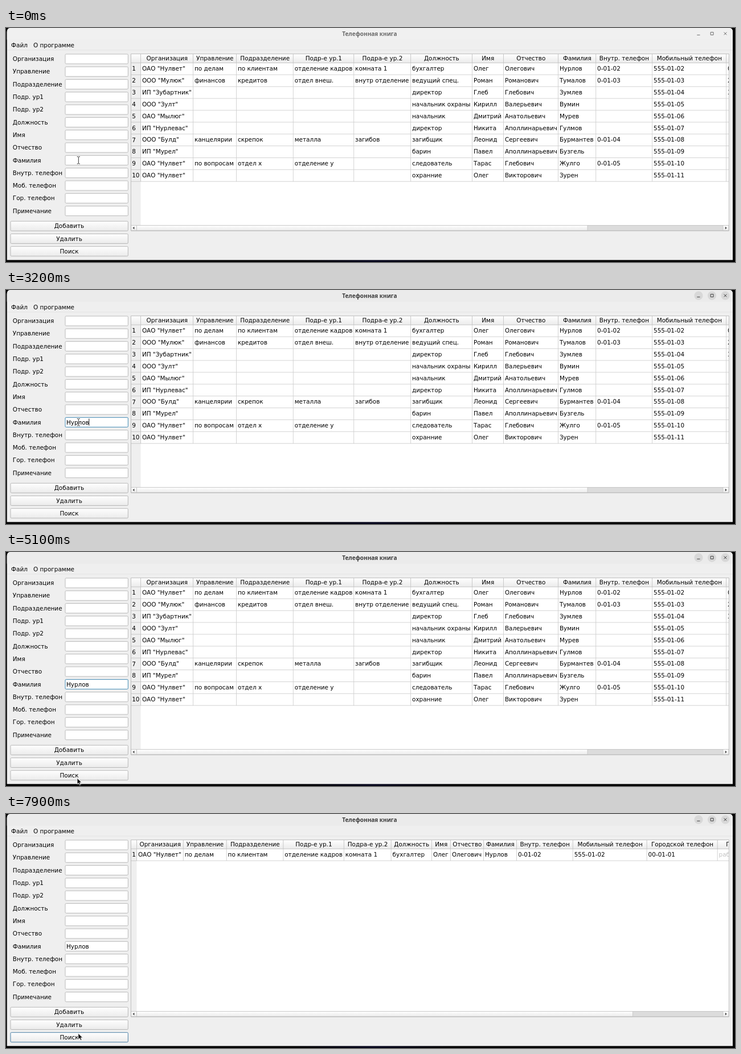
An HTML page for the animation above (8000 ms loop, 1280 px wide and 412 px high).

```html
<!DOCTYPE html>
<html lang="ru">
<head>
<meta charset="utf-8">
<title>Телефонная книга</title>
<style>
  html, body { margin: 0; width: 100%; height: 100%; overflow: hidden; background: #000; }
  svg { display: block; width: 100%; height: 100%; }
  text { font: 10.45px "DejaVu Sans", sans-serif; fill: #000; white-space: pre; }
  .title { font: bold 10px "Noto Sans", sans-serif; fill: #3d3d3d; }
  .mid { text-anchor: middle; }
  .note { fill: #c2c2c2; }
</style>
</head>
<body>
<svg id="stage" viewBox="0 0 1280 412">
  <defs>
    <linearGradient id="raised" x2="0" y2="1">
      <stop stop-color="#fefefe"/><stop offset="1" stop-color="#ebebeb"/>
    </linearGradient>
    <linearGradient id="glow">
      <stop stop-color="#000"/><stop offset=".5" stop-color="#07071e"/><stop offset="1" stop-color="#000"/>
    </linearGradient>
    <clipPath id="view"><rect x="219" y="45" width="1050" height="302"/></clipPath>
  </defs>
</svg>
<script>
const LOOP = 8000;
const stage = document.getElementById('stage');

function add(parent, tag, attrs, content) {
  const el = document.createElementNS('http://www.w3.org/2000/svg', tag);
  for (const key in attrs) el.setAttribute(key, attrs[key]);
  if (content !== undefined) el.textContent = content;
  return parent.appendChild(el);
}
const rect = (parent, x, y, width, height, fill, more) =>
  add(parent, 'rect', { x, y, width, height, fill, ...more });
const path = (parent, d, stroke, more) =>
  add(parent, 'path', { d, stroke, fill: 'none', ...more });
const label = (parent, x, y, content, cls = '') =>
  add(parent, 'text', { x, y, class: cls }, content);
const show = (el, on) => el.setAttribute('visibility', on ? 'visible' : 'hidden');

// Window frame, title bar and menu
rect(stage, 500, 408, 290, 4, 'url(#glow)');
path(stage, 'M1.7 408.5V7Q1.7 0 8 0H1270Q1276 0 1276 7V408.5Z', 'none', { fill: '#efefef' });
const titleBar = path(stage, 'M1.7 20.5V7Q1.7 0 8 0H1270Q1276 0 1276 7V20.5Z', 'none');
const title = label(stage, 638.5, 14, 'Телефонная книга', 'title mid');
const discs = add(stage, 'g', { fill: '#d8d8d8' });
for (const cx of [1216, 1239.5, 1263]) add(discs, 'circle', { cx, cy: 9.8, r: 7.6 });
const icons = path(stage,
  'M1213.3 12.3h5.2M1237.2 7.4h4.8v4.8h-4.8zM1260.6 7.4l4.8 4.8m0-4.8l-4.8 4.8', '#3d3d3d');
label(stage, 9, 34.2, 'Файл');
label(stage, 48, 34.2, 'О программе');
path(stage, 'M2 38.9H1276', '#dedede', { 'stroke-width': .7 });

// Form
const fieldY = i => 54.4 + i * 22.3;
const captions = ['Организация', 'Управление', 'Подразделение', 'Подр. ур1', 'Подр. ур2', 'Должность',
  'Имя', 'Отчество', 'Фамилия', 'Внутр. телефон', 'Моб. телефон', 'Гор. телефон', 'Примечание'];
const fields = captions.map((name, i) => {
  label(stage, 11.8, fieldY(i) + 3.7, name);
  return rect(stage, 104, fieldY(i) - 8.4, 110.3, 17, '#fff', { rx: 1.6, stroke: '#b4b4b4', 'stroke-width': .9 });
});
const surnameField = fields[8];
const typed = label(stage, 105.9, fieldY(8) + 3.7, '');
const caret = rect(stage, 0, 226.5, .9, 12.3, '#000');

const buttons = ['Добавить', 'Удалить', 'Поиск'].map((name, i) => {
  const y = 348.7 + i * 22.25;
  const face = rect(stage, 8, y - 8.5, 206.3, 17, 'url(#raised)', { rx: 1.6, stroke: '#b0b0b0', 'stroke-width': .9 });
  label(stage, 111, y + 3.7, name, 'mid');
  return face;
});
const searchButton = buttons[2];

// Tables
const headings = ['Организация', 'Управление', 'Подразделение', 'Подр-е ур.1', 'Подра-е ур.2', 'Должность', 'Имя',
  'Отчество', 'Фамилия', 'Внутр. телефон', 'Мобильный телефон', 'Городской телефон', 'Примечание'];
const people = [
  'ОАО "Нулвет"|по делам|по клиентам|отделение кадров|комната 1|бухгалтер|Олег|Олегович|Нурлов|0-01-02|555-01-02|00-01-01|рабочий',
  'ООО "Мулюк"|финансов|кредитов|отдел внеш.|внутр отделение|ведущий спец.|Роман|Романович|Тумалов|0-01-03|555-01-03|20-01-02',
  'ИП "Зубартник"|||||директор|Глеб|Глебович|Зумлев||555-01-04|30-01-03',
  'ООО "Зулт"|||||начальник охраны|Кирилл|Валерьевич|Вумин||555-01-05',
  'ОАО "Мылюг"|||||начальник|Дмитрий|Анатольевич|Мурев||555-01-06',
  'ИП "Нурлевас"|||||директор|Никита|Аполлинарьевич|Гулмов||555-01-07',
  'ООО "Булд"|канцелярии|скрепок|металла|загибов|загибщик|Леонид|Сергеевич|Бурмантев|0-01-04|555-01-08',
  'ИП "Мурел"|||||барин|Павел|Аполлинарьевич|Бузгель||555-01-09',
  'ОАО "Нулвет"|по вопросам|отдел x|отделение у||следователь|Тарас|Глебович|Жулго|0-01-05|555-01-10',
  'ОАО "Нулвет"|||||охранние|Олег|Викторович|Зурен||555-01-11',
].map(line => line.split('|'));

rect(stage, 219.5, 45.6, 1050, 311.4, '#fff');

function drawTable(edges, rows, handleEnd) {
  const table = add(stage, 'g', {});
  const view = add(table, 'g', { 'clip-path': 'url(#view)' });
  const left = edges[0], top = 61.4, pitch = 20.88;
  const bottom = top + rows.length * pitch;
  rect(view, 219.5, top, left - 219.5, 290, '#efefef');
  rect(view, 219.5, 46, 1050, top - 46, 'url(#raised)');
  let grid = '', ticks = `M219 ${top}H1269`;
  edges.forEach((x, i) => {
    ticks += `M${x} 46V${top}`;
    if (i) grid += `M${x} ${top}V${bottom}`;
    if (edges[i + 1]) label(view, (x + edges[i + 1]) / 2 + .3, 57.4, headings[i], 'mid');
  });
  ticks += `M${left} ${top}V${bottom}`;
  rows.forEach((cells, r) => {
    const y = top + r * pitch;
    grid += `M${left} ${y + pitch}H1269`;
    ticks += `M219 ${y + pitch}H${left}`;
    label(view, 221.2, y + 13.9, r + 1);
    cells.forEach((cell, i) => {
      if (cell && edges[i + 1]) label(view, edges[i] + 2.4, y + 13.7, cell, i === 12 ? 'note' : '');
    });
  });
  path(view, grid, '#cfcfcf', { 'stroke-width': .9 });
  path(view, ticks, '#c3c3c3', { 'stroke-width': .9 });
  // Scroll bar
  rect(table, 219.5, 347.4, 1049.5, 9.4, '#dcdcdc', { stroke: '#bdbdbd', 'stroke-width': .8 });
  for (const [x, end] of [[219.5, 229.3], [229.3, handleEnd], [1259, 1269]])
    rect(table, x, 347.4, end - x, 9.4, 'url(#raised)', { stroke: '#c4c4c4', 'stroke-width': .8 });
  path(table, 'M225.4 349.8v4.6l-2.9-2.3zM1262.8 349.8v4.6l2.9-2.3z', 'none', { fill: '#444' });
  return table;
}
const fullTable = drawTable(
  [236.5, 328.5, 404.5, 504.3, 610.7, 710.6, 818.5, 873.5, 969.5, 1035.7, 1134.6, 1264.6, 1388.6], people, 1021);
const foundTable = drawTable(
  [229.5, 311.3, 387.2, 486.8, 593.4, 676.2, 747.5, 780.5, 838.6, 896.5, 995.3, 1125.2, 1249.2, 1347], people.slice(0, 1), 1100.5);
path(stage, 'M219.4 45.6H1269.4V357H219.4Z', '#b8b8b8', { 'stroke-width': .9 });

// Pointers, drawn with the hot spot at the origin
const beamShape = 'M-2.6 -6.2H-.8L0 -5.5L.8 -6.2H2.6M0 -5.5V5.5M-2.6 6.2H-.8L0 5.5L.8 6.2H2.6';
const beam = add(stage, 'g', {});
path(beam, beamShape, '#fff', { 'stroke-width': 2 });
path(beam, beamShape, '#333', { 'stroke-width': 1 });
const arrow = path(stage, 'M0 0V10.6L2.5 8.4L4.2 12.2L6.2 11.3L4.5 7.6H7.9Z', '#fff',
  { fill: '#111', 'stroke-width': .8 });

// Timelines: [start, values...]; each row holds until the next
const letters = [[0, 0], [2200, 1], [2900, 2], [3000, 4], [3200, 6]];
const caretSteps = [[0, 0], [600, 1], [1200, 0], [1800, 1], [3900, 0], [4500, 1], [5100, 0]];
const pointer = [[0, 127.3, 232.8], [3900, 127.5, 242], [4000, 128, 258], [4100, 128, 276.8], [4200, 124, 302],
  [4300, 115, 326], [4400, 103, 348], [4500, 97, 367], [4600, 108, 385], [4700, 123.8, 395.8],
  [4800, 125, 398.3], [7900, 126.8, 386.3]];
const at = (steps, t) => steps.findLast(step => step[0] <= t);

function draw(t) {
  const active = t >= 600, pressed = t >= 5400 && t < 5500, found = t >= 5500;
  titleBar.setAttribute('fill', active ? '#ebebeb' : '#f0f0f0');
  title.style.fill = active ? '#3d3d3d' : '#6b6b6b';
  icons.setAttribute('stroke', active ? '#3d3d3d' : '#6b6b6b');
  show(discs, active);

  surnameField.setAttribute('stroke', active && t < 5400 ? '#2f7fae' : '#b4b4b4');
  typed.textContent = people[0][8].slice(0, at(letters, t)[1]);
  caret.setAttribute('x', 105.9 + (typed.textContent ? typed.getComputedTextLength() - .4 : 0));
  show(caret, at(caretSteps, t)[1]);

  searchButton.setAttribute('fill', pressed ? '#d8d9da' : 'url(#raised)');
  searchButton.setAttribute('stroke', pressed || found ? '#35709b' : '#b0b0b0');
  show(fullTable, !found);
  show(foundTable, found);

  const [, x, y] = at(pointer, t);
  const overField = x > 104 && captions.some((_, i) => Math.abs(y - fieldY(i)) < 8.5);
  for (const el of [beam, arrow]) el.setAttribute('transform', `translate(${x} ${y})`);
  show(beam, overField);
  show(arrow, !overField);
}

const start = performance.now();
function tick() {
  draw((performance.now() - start) % LOOP);
  requestAnimationFrame(tick);
}
tick();
</script>
</body>
</html>
```
